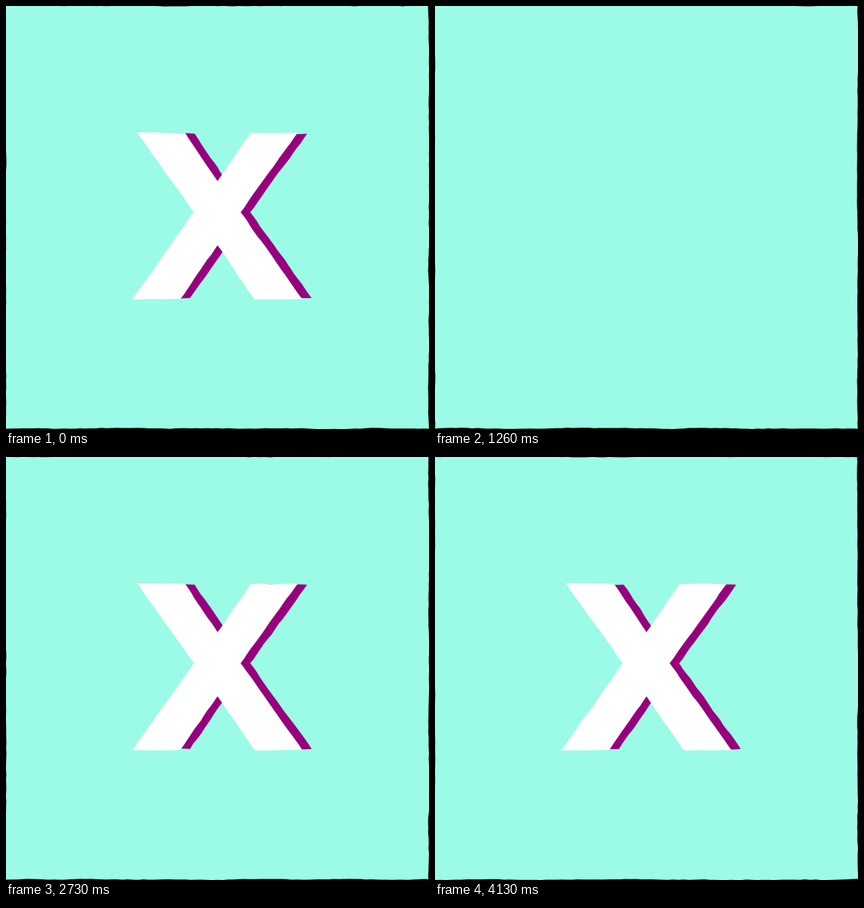
Write an HTML page with a canvas that moves like this. It is 640 by 640 pixels and loops after 4200 ms.

```html
<!DOCTYPE html>
<html lang="en">
<head>
<meta charset="utf-8">
<title>Leaping X</title>
<style>
html, body { margin: 0; width: 100%; height: 100%; overflow: hidden; background: #9bfbe6; }
canvas { display: block; width: 640px; height: 640px; }
</style>
</head>
<body>
<canvas id="stage" width="640" height="640"></canvas>
<script>
const ctx = document.getElementById('stage').getContext('2d');
const LOOP = 4200, STEP = 70, WATER = 448, PI = Math.PI;
const MINT = '#9bfbe6', PLUM = '#96007c', WHITE = '#fff', ORANGE = '#f7942a';
let frame = 0;

const clamp = v => Math.max(0, Math.min(1, v));
const lerp = (a, b, u) => a + (b - a) * u;

function hash(a, b) {
  const s = Math.sin(a * 127.1 + b * 311.7 + frame * 74.7) * 43758.5453;
  return s - Math.floor(s);
}

// Smooth noise in -1..1, redrawn on every step
function noise(x, seed) {
  const i = Math.floor(x), f = x - i;
  return lerp(hash(i, seed), hash(i + 1, seed), f * f * (3 - 2 * f)) * 2 - 1;
}

function fillPoly(pts, color) {
  ctx.fillStyle = color;
  ctx.beginPath();
  pts.forEach(p => ctx.lineTo(p[0], p[1]));
  ctx.closePath();
  ctx.fill();
}

function line(a, b, width, color) {
  ctx.strokeStyle = color;
  ctx.lineWidth = width;
  ctx.lineCap = 'round';
  ctx.beginPath();
  ctx.moveTo(a[0], a[1]);
  ctx.lineTo(b[0], b[1]);
  ctx.stroke();
}

function drawPaper() {
  ctx.fillStyle = '#000';
  ctx.fillRect(0, 0, 640, 640);
  const edge = (seed, mean) => Array.from({ length: 81 }, (_, i) =>
    [i * 8, mean + noise(i / 5, seed) * 0.9 + noise(i, seed + 9) * 0.35]);
  const flip = pts => pts.map(p => [p[1], p[0]]);
  fillPoly([...edge(1, -0.5), ...flip(edge(2, 639.5)),
    ...edge(3, 639.1).reverse(), ...flip(edge(4, -0.5)).reverse()], MINT);
}

const LETTER = [[198, 191], [271, 192], [320, 265], [370, 192], [441, 192], [355, 312],
  [448, 443], [376, 444], [320, 362], [264, 443], [191, 444], [284, 312]];

function roughen(pts, amount, seed) {
  return pts.flatMap((a, k) => {
    const b = pts[(k + 1) % pts.length];
    const dx = b[0] - a[0], dy = b[1] - a[1], len = Math.hypot(dx, dy);
    const n = Math.round(len / 9);
    return Array.from({ length: n }, (_, i) => {
      const d = i ? noise(i * 0.6, seed + k) * amount / len : 0;
      return [a[0] + dx * i / n - dy * d, a[1] + dy * i / n + dx * d];
    });
  });
}

function drawLetter(squash) {
  ctx.save();
  ctx.translate(320, 443);
  ctx.scale(1 + squash * 0.7, 1 - squash);
  ctx.translate(-320, -443);
  const shade = LETTER.map(p => [p[0] + 14.5, lerp(318, p[1], 0.99)]);
  fillPoly(roughen(shade, 0.8, 20), PLUM);
  fillPoly(roughen(LETTER, 0.6, 50), WHITE);
  ctx.restore();
}

const hop = (x0, y0, x1, y1, rise) =>
  u => [lerp(x0, x1, u), lerp(y0, y1, u) - 4 * rise * u * (1 - u)];

// A brush stroke along path(u), growing from a thin tail
function brush(path, tail, head, width, shift, color) {
  let last = path(tail), run = 0;
  for (let i = 1; i <= 40; i++) {
    const p = path(lerp(tail, head, i / 40));
    run += Math.hypot(p[0] - last[0], p[1] - last[1]);
    line([last[0] + shift, last[1]], [p[0] + shift, p[1]], Math.min(width, 4 + run), color);
    last = p;
  }
}

// A stroke leaping out of or into the water
function worm(path, tail, head, width, shift) {
  tail = clamp(tail);
  head = clamp(head);
  if (head <= tail) return;
  ctx.save();
  ctx.beginPath();
  ctx.rect(0, 0, 640, WATER);
  ctx.clip();
  brush(path, tail, head, width, shift, PLUM);
  brush(path, tail, head, width, 0, WHITE);
  ctx.restore();
}

// age is 1 at full size; drops fan out from angle a0 to a1
function splash(x, y, age, half, crown, drops, a0, a1) {
  if (age <= 0 || age >= 2.6) return;
  const size = age < 1 ? lerp(0.4, 1, age) : 1 - (age - 1) / 1.7;
  const w = half * size, h = (3 + half * 0.15) * size, c = crown * size;
  const soft = v => Math.sign(v) * Math.abs(v) ** 0.7;
  const pts = [];
  for (let i = 0; i < 40; i++) {
    const a = i / 20 * PI, k = 1 + noise(i / 2, x) * 0.13;
    pts.push([x + w * soft(Math.cos(a)) * (1 + (k - 1) / 2), y + h * soft(Math.sin(a)) * k]);
  }
  fillPoly(pts, ORANGE);
  ctx.beginPath();
  ctx.moveTo(x - w * 0.5, y - h * 0.6);
  ctx.quadraticCurveTo(x - 6, y - h - 2, x - 5, y - h - c);
  ctx.lineTo(x - 1, y - h - c);
  ctx.quadraticCurveTo(x + 3, y - h - 2, x + w * 0.5, y - h * 0.6);
  ctx.fill();
  for (let i = 0; i < drops; i++) {
    const a = lerp(a0, a1, i / (drops - 1));
    const p = [x + half * 1.25 * Math.cos(a) * age,
      y + half * 0.75 * Math.sin(a) * age * (1.6 - 0.6 * age)];
    line(p, p, 5 * Math.min(1, 0.5 + size / 2), ORANGE);
  }
}

const arc = (x, y, r) => a => [x + r * Math.cos(a), y + r * Math.sin(a)];

// Concentric bristle marks of the spinning letter; k counts steps from the widest spread
function drawSpin(k) {
  ctx.save();
  ctx.translate(140 + (k < 0 ? -70 : -25) * k, 180 + (k < 0 ? -50 : 60) * k);
  ctx.rotate(k * 0.6);
  ctx.translate(-140, -180);
  for (const [shift, color] of [[15.5, PLUM], [0, WHITE]]) {
    const mark = (path, a0, a1, width) => brush(path, a0, a1, width, shift, color);
    mark(arc(60, 128, 98), -1.48, -0.68, 15);
    mark(arc(60, 128, 58), -1.45, -1.18, 10);
    for (let i = 0; i < 4; i++)
      mark(arc(75, 215, 147 - 8 * i), -0.98, -0.275 - 0.08 * i, 16);
    mark(arc(75, 215, 163), -0.39, -0.32, 7);
    mark(arc(75, 215, 36), -2.3, -2.75, 5.5);
    mark(arc(150, 285, 96), -2.51, -2.61, 6);
    mark(arc(150, 285, 87), -2.62, -3.29, 15);
  }
  ctx.restore();

  for (const [x, y, size] of [[271, 160, 6], [276, 183, 4], [222, 253, 2], [239, 275, 8]]) {
    const px = x - 10 * k, py = y + 14 * k;
    line([px - 3, py - 3], [px + 3, py + 3], size, ORANGE);
  }
}

const LEAP = hop(300, 330, 605, 520, 230);
const BREAK = hop(420, 440, 190, 130, 0);
const DIVE = hop(190, 80, 66, 560, 60);
const RISE_LEFT = hop(66, 540, 275, 250, 150);
const RISE_RIGHT = hop(430, 540, 350, 300, 150);

function draw(t) {
  drawPaper();
  if (t < 490) drawLetter(t < 420 ? 0 : 0.1);
  if (t >= 2240) {
    const n = (t - 2240) / STEP;
    drawLetter(0.33 * Math.exp(-n) * Math.cos(n * 2.4));
  }

  if (t >= 490 && t < 840) {
    const tail = (t - 490) / 210 * 0.915;
    worm(LEAP, tail, tail + 0.45, t < 560 ? 46 : 28, 16);
  }
  if (t >= 490 && t < 560) worm(BREAK, 0, 0.9, 58, 15);
  if (t >= 560 && t < 840) drawSpin((t - 700) / STEP);
  if (t >= 840 && t < 1120) {
    const tail = 0.05 + (t - 840) / 240;
    worm(DIVE, tail, tail + 0.45, 30, 16);
  }
  if (t >= 1820 && t < 2240) {
    const move = (t - 1890) / STEP * 0.24;
    worm(RISE_LEFT, move - 0.27, 0.135 + move, 28, -8);
    worm(RISE_RIGHT, move - 0.35, 0.05 + move, 32, 14);
  }

  splash(580, 447, (t - 560) / 140, 19, 4, 3, 1.11 * PI, 1.94 * PI);
  splash(66, 446, (t - 840) / 105, 22, 5, 3, 1.11 * PI, 1.94 * PI);
  splash(88, 445, (t - 1750) / 140, 20, 0, 2, 1.53 * PI, 1.92 * PI);
  splash(415, 441, (t - 1680) / 210, 38, 10, 3, PI, 1.53 * PI);
}

function tick() {
  frame = Math.floor(performance.now() % LOOP / STEP);
  draw(frame * STEP);
  requestAnimationFrame(tick);
}
tick();
</script>
</body>
</html>
```
